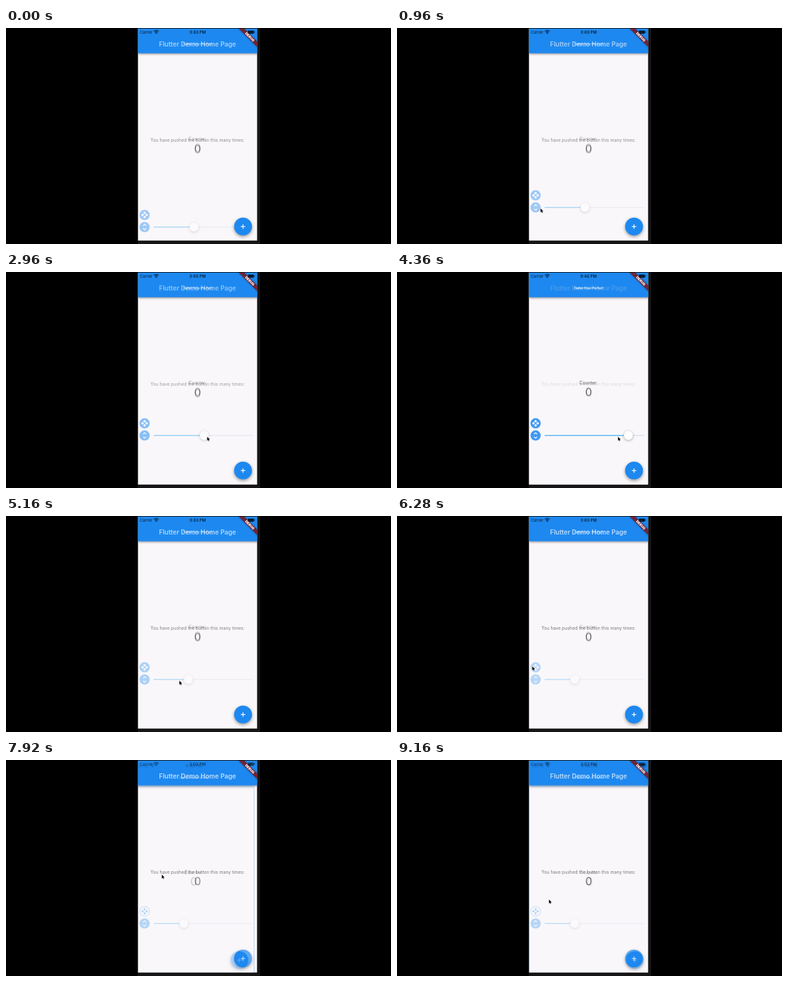
An HTML page with a canvas that plays this animation: 600 px wide and 338 px high, repeating every 9.2 s.

```html
<!DOCTYPE html>
<html lang="en">
<head>
<meta charset="utf-8">
<title>Design overlay on a counter app</title>
<style>
  html, body { margin: 0; width: 100%; height: 100%; overflow: hidden; background: #000; }
  canvas { display: block; width: 600px; height: 338px; }
</style>
</head>
<body>
<canvas id="stage"></canvas>
<script>
const W = 600, H = 338, LOOP = 9200;
const BLUE = '#1e89f0', PAPER = '#f9f7fa', INK = '#404044', DIGIT = '#5c5c60';
const SCREEN = { x: 205.5, y: 1, w: 186, h: 331.7 };
const MID = 298.5;
const ICON_X = 216, ICON_GAP = 19;
const TRACK = { from: 230, to: 385 };
const CURSOR_IN = 120, MOVE_MODE = 6400;
const dpr = window.devicePixelRatio || 1;

function prepare(canvas) {
  canvas.width = W * dpr;
  canvas.height = H * dpr;
  const c = canvas.getContext('2d');
  c.scale(dpr, dpr);
  return c;
}

const stage = prepare(document.getElementById('stage'));
const scratch = prepare(document.createElement('canvas'));

// Motion: eased steps between two times, added up

function ease(t, from, to) {
  const u = Math.min(1, Math.max(0, (t - from) / (to - from)));
  return u * u * (3 - 2 * u);
}

const panelY = t => 311.5 - 59.5 * ease(t, 400, 1500) + 3.8 * ease(t, 1680, 1960);

const thumbX = t => 293 + 92 * ease(t, 2860, 3240) - 108 * ease(t, 3900, 5400);

const shift = t => ({
  x: 2 * ease(t, 6800, 7160) - 8 * ease(t, 7400, 7920) + 7.2 * ease(t, 7920, 8500),
  y: 3 * ease(t, 6800, 7160) - 0.5 * ease(t, 7400, 7920)
});

function cursorAt(t) {
  const y = panelY(t), moved = shift(t);
  let x = 223.7, cy = y + 1.5;
  const go = (from, to, nx, ny) => {
    const k = ease(t, from, to);
    x += (nx - x) * k;
    cy += (ny - cy) * k;
  };
  go(2000, 2680, thumbX(t + 50) - 11.5, y + 2);
  go(5500, 6280, ICON_X - 5.2, y - ICON_GAP - 1.6);
  go(6420, 6800, 248.8 + moved.x, 176.8 + moved.y);
  go(8500, 9160, 236.8, 218.3);
  return { x, y: cy };
}

// Drawing helpers

function text(c, s, x, y, size, weight, color, align = 'center') {
  c.font = `${weight} ${size}px Inter, Roboto, sans-serif`;
  c.textAlign = align;
  c.fillStyle = color;
  c.fillText(s, x, y);
}

function rect(c, x, y, w, h, color) {
  c.fillStyle = color;
  c.fillRect(x, y, w, h);
}

function disc(c, x, y, r, color) {
  c.beginPath();
  c.arc(x, y, r, 0, Math.PI * 2);
  c.fillStyle = color;
  c.fill();
}

function line(c, points, color, width) {
  c.beginPath();
  points.forEach(([x, y]) => c.lineTo(x, y));
  c.strokeStyle = color;
  c.lineWidth = width;
  c.stroke();
}

function shadow(c, color, blur, dy, draw) {
  c.save();
  c.shadowColor = color;
  c.shadowBlur = blur * dpr;
  c.shadowOffsetY = dy * dpr;
  draw();
  c.restore();
}

// Draws a group with one common opacity
function group(alpha, dx, dy, draw) {
  scratch.clearRect(0, 0, W, H);
  draw(scratch);
  stage.save();
  stage.globalAlpha = alpha;
  stage.drawImage(scratch.canvas, dx, dy, W, H);
  stage.restore();
}

// Parts of the scene

function statusBar(c, time) {
  const ink = '#0b1f36';
  text(c, 'Carrier', 209, 8.7, 5.9, 400, ink, 'left');
  text(c, time, MID, 8.7, 6.2, 600, ink);
  c.strokeStyle = ink;
  c.lineWidth = 1;
  for (let r = 2.2; r < 6; r += 1.7) {
    c.beginPath();
    c.arc(234.2, 9.2, r, -Math.PI * 0.75, -Math.PI * 0.25);
    c.stroke();
  }
  disc(c, 234.2, 8.6, 0.8, ink);
  c.beginPath();
  c.roundRect(377, 4, 9.5, 5, 1.2);
  c.fillStyle = ink;
  c.fill();
  rect(c, 387, 5.6, 0.8, 1.8, ink);
}

function addButton(c, x, y) {
  shadow(c, 'rgba(0,0,0,.4)', 5, 2, () => disc(c, x, y, 13.9, BLUE));
  line(c, [[x - 3.5, y], [x + 3.5, y]], '#fff', 1.2);
  line(c, [[x, y - 3.5], [x, y + 3.5]], '#fff', 1.2);
}

function appFrame(c, time) {
  const { x, y, w, h } = SCREEN;
  rect(c, x, y, w, h, PAPER);
  shadow(c, 'rgba(0,0,0,.4)', 3, 1, () => rect(c, x, y, w, 38.5, BLUE));
  statusBar(c, time);
  addButton(c, 369.4, 310.7);
}

function app(c) {
  appFrame(c, '3:03 PM');
  text(c, 'Flutter Demo Home Page', MID, 29, 10, 600, '#fff');
  text(c, 'You have pushed the button this many times:', MID, 178, 6.95, 400, INK);
  text(c, '0', MID, 196.2, 17, 400, DIGIT);
}

function design(c) {
  const { x, y, w, h } = SCREEN;
  appFrame(c, '9:46 PM');
  c.strokeStyle = BLUE;
  c.lineWidth = 1;
  c.strokeRect(x - 1, y - 1, w + 2, h + 2);
  text(c, 'Flutter Pixel Perfect', MID, 27.3, 4.75, 700, '#fff');
  text(c, 'Counter:', MID, 175.7, 6.95, 400, INK);
  text(c, '0', MID, 193.8, 17, 400, DIGIT);
}

function moveIcon(c, x, y, color) {
  c.save();
  c.translate(x, y);
  c.rotate(Math.PI / 4);
  for (const dx of [-1, 1]) {
    for (const dy of [-1, 1]) {
      rect(c, dx * 2.3 - 1.6, dy * 2.3 - 1.6, 3.2, 3.2, color);
    }
  }
  c.restore();
}

function panel(c, y, thumb, outlined) {
  const x = ICON_X, top = y - ICON_GAP;
  disc(c, x, top, 8, BLUE);
  if (outlined) disc(c, x, top, 7.2, '#fff');
  moveIcon(c, x, top, outlined ? BLUE : '#fff');
  disc(c, x, y, 8, BLUE);
  for (const d of [-1, 1]) {
    line(c, [[x - 2.4, y + d * 2], [x, y + d * 4.4], [x + 2.4, y + d * 2]], '#fff', 1.2);
  }
  line(c, [[thumb, y], [TRACK.to, y]], 'rgba(120,150,185,.3)', 1.4);
  line(c, [[TRACK.from, y], [thumb, y]], '#3aa8ee', 1.5);
  shadow(c, 'rgba(0,0,0,.4)', 4, 1, () => disc(c, thumb, y, 7, '#fff'));
}

function banner(c) {
  c.save();
  c.translate(380, 14);
  c.rotate(Math.PI / 4);
  shadow(c, 'rgba(0,0,0,.4)', 3, 0, () => rect(c, -30, -3, 60, 6, '#702436'));
  text(c, 'DEBUG', 0, 1.9, 5.3, 900, '#fff');
  c.restore();
}

function cursor(c, x, y) {
  const shape = [[0, 0], [0, 7], [1.6, 5.5], [2.7, 8], [3.8, 7.5], [2.7, 5.1], [4.9, 5]];
  c.save();
  c.translate(x, y);
  c.scale(0.88, 0.88);
  c.beginPath();
  shape.forEach(([px, py]) => c.lineTo(px, py));
  c.closePath();
  c.lineJoin = 'round';
  c.lineWidth = 0.9;
  c.strokeStyle = '#fff';
  c.stroke();
  c.fillStyle = '#000';
  c.fill();
  c.restore();
}

function render(t) {
  const c = stage;
  const thumb = thumbX(t), moved = shift(t), hand = cursorAt(t);
  const alpha = (thumb - TRACK.from) / (TRACK.to - TRACK.from);

  rect(c, 0, 0, W, H, '#000');
  rect(c, SCREEN.x, 0, 190.5, H, '#161617');
  c.save();
  c.beginPath();
  c.rect(SCREEN.x, SCREEN.y, SCREEN.w, SCREEN.h);
  c.clip();
  app(c);
  group(alpha, moved.x, moved.y, design);
  banner(c);
  c.restore();

  group(alpha, 0, 0, g => panel(g, panelY(t), thumb, t >= MOVE_MODE));
  if (t >= CURSOR_IN) cursor(c, hand.x, hand.y);
}

const start = performance.now();
function tick() {
  render((performance.now() - start) % LOOP);
  requestAnimationFrame(tick);
}
tick();
</script>
</body>
</html>
```
